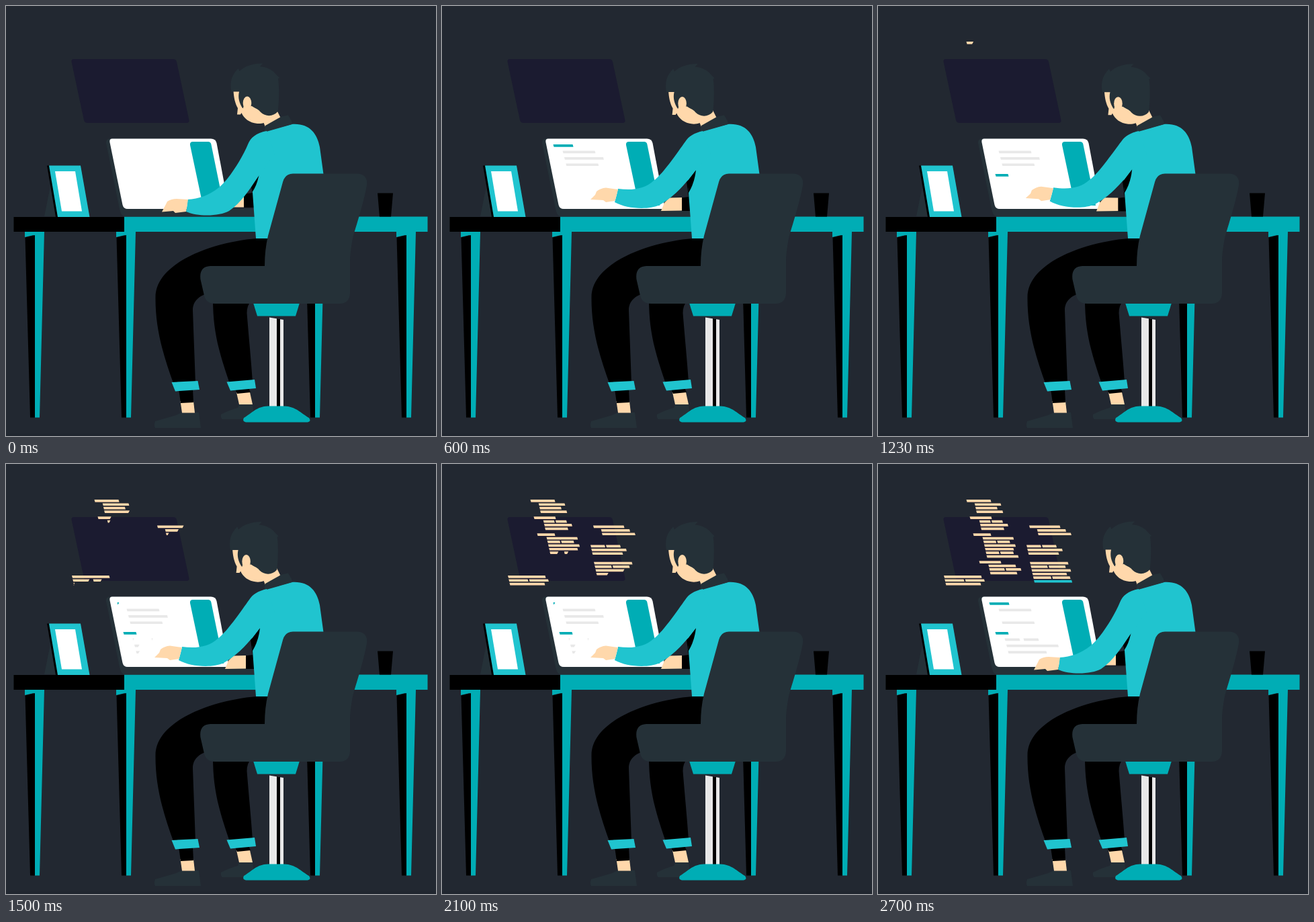
An HTML page that plays this animation: 640 by 640 pixels, repeating every 2.73 s.

```html
<!DOCTYPE html>
<html lang="en">
<head>
<meta charset="utf-8">
<title>Working at a desk</title>
<style>
  html, body { margin: 0; width: 100%; height: 100%; overflow: hidden; background: #222831; }
  svg { display: block; width: 100vw; height: 100vh; }
  .dark { fill: #253138; }
  .teal { fill: #00adb5; }
  .aqua { fill: #20c4cf; }
  .skin { fill: #ffd8ab; }
  .grey { fill: #e8e8e8; }
  .white { fill: #fff; }
</style>
</head>
<body>
<svg viewBox="0 0 640 640" xmlns="http://www.w3.org/2000/svg">
  <rect width="640" height="640" fill="#222831"/>
  <rect y="636" width="640" height="4" fill="#20262f"/>
  <path fill="#1b1b30" d="M101 79H249Q253 79 254 83L272.500 170Q273 174 269 174H121Q117 174 116 170L97.500 83Q97 79 101 79Z"/>
  <g id="code"></g>

  <g id="legs"></g>
  <path d="M11.500 314H176V336H11.500Z"/>
  <path class="teal" d="M176 313.500H627.500V336H176Z"/>
  <path d="M553 278.500H576L573 313.500H556Z"/>

  <path class="dark" d="M66 268L57 313H75Z"/>
  <path d="M61 237.500H65L78 314H74Z"/>
  <path class="aqua" d="M64 237.500H111L124.500 314H77Z"/>
  <path class="white" d="M73 246H103L113 305.500H83Z"/>

  <path class="dark" d="M156 197H306L330 302H371V313.500H176Q171 312 169 302L149 204Q148 198 156 197Z"/>
  <path class="white" d="M158 197.500H305Q312 197.500 313.500 204L332 302H181Q175 302 173.500 296L154.500 203Q153.500 197.500 158 197.500Z"/>
  <path class="teal" d="M278 202H301Q304.500 202 305.300 205.500L324 297H298Q293 297 292 292L274 207Q273.500 202 278 202Z"/>
  <g id="text"></g>

  <path class="dark" d="M347 593H367L370 615H322Q319 613 320 608Q333 601 345 598Z"/>
  <path class="skin" d="M343 575H363L367 593H347Z"/>
  <path d="M340 568H361L364 575L344 577Z"/>
  <path d="M308 436C308 485 317 515 333 562L367 560C365 530 362 500 358.500 457Q358.500 446 364 440Z"/>
  <path class="aqua" d="M328.500 559.500L370 556L372 569L334 572.500Z"/>
  <path class="dark" d="M262 605H287L290 628H222Q220 624 222 618Q240 613 253 609Z"/>
  <path class="skin" d="M259.500 588H279L281 605.500H262Z"/>
  <path d="M257 570H278L279 590L260 591Z"/>
  <path d="M392 346H373C310 351 223 381 222.500 433C222 480 234 520 250 564L282 562L278 453C278 439 288 431 300 428L392 420Z"/>
  <path class="aqua" d="M246.500 560L285.500 558L288 571L252 573.500Z"/>

  <path class="skin" d="M378 160L403 155L409 167L386 180Z"/>
  <path id="sleeve"/>
  <path id="farHand" class="skin"/>
  <path class="aqua" d="M384 187L425 176C451 174 463 189 467 210L473 254L430 346H372L366 264L362 212Z"/>
  <path id="gap"/>
  <path class="dark" d="M386 178L409 165L420 162.500L425 171L426 176L384 188Z"/>
  <path id="arm" class="aqua"/>
  <path id="hand" class="skin"/>

  <g id="head">
    <path class="skin" d="M338.500 126H350L362 146L402 157C400 166 388 176 374 175C362 174 354 167 350.500 159L349 161.500H344L345 152C341 145 339 136 338.500 126Z"/>
    <path class="dark" d="M335.500 127.500C332 109 339 100 345.500 93L347.500 97C355 89 370 85 382 85.500L378 90C388 91 397 95 401 101L407 107L405 108C407 120 406.500 145 404.500 157C398 165 386 165 379 158C374 152 369 152 366 150L352 152C347 144 345 136 347 127.500Z"/>
    <ellipse class="skin" cx="359" cy="144.500" rx="6.300" ry="10"/>
    <path class="skin" d="M353 150L366 149L377 156L372 166L356 164Z"/>
  </g>

  <path class="teal" d="M368 442H437L431 461.500H374Z"/>
  <path class="grey" d="M392 463.500L413 467V597H392Z"/>
  <path d="M403 465L408 466V597H403Z"/>
  <path class="teal" d="M357 619.500Q351 618 354 613C366 606 373 596 390 595.500H414C431 596 439 606 451 613Q455 618 449 619.500Z"/>
  <path class="dark" d="M427 249.500H522Q539 250 537 267C532 295 521 327 516 346Q512 367 512 380V428Q511 443 496 443H311Q298 443 295 431L289.500 407Q287 388 304 387H385Q385 363 390 342L412 262Q415.500 249.500 427 249.500Z"/>
</svg>
<script>
const LOOP = 2730, STEP = 30, SWAY = 900;
const $ = id => document.getElementById(id);
const clamp = v => Math.max(0, Math.min(1, v));

function add(parent, cls, d = '') {
  const p = document.createElementNS('http://www.w3.org/2000/svg', 'path');
  p.setAttribute('class', cls);
  p.setAttribute('d', d);
  $(parent).append(p);
  return p;
}

for (const x of [28, 164, 445, 581]) {
  add('legs', 'teal', `M${x} 336h29l-7 276.500h-7L${x + 13} 341L${x} 344Z`);
  add('legs', '', `M${x + .5} 344.500L${x + 15} 341V612.500H${x + 8}Z`);
}

// Every bar knows its place, full width and how much of it shows at a time
const bars = [];
function bar(parent, cls, x, y, w, shown) {
  const el = add(parent, cls);
  bars.push(t => {
    const part = clamp(shown(t)), now = w * part;
    // The end leans back until the bar is complete
    const lean = part === 1 ? 1 : -Math.min(2, now);
    el.setAttribute('d', now < .5 ? '' : `M${x} ${y}h${now}l${lean} 3.7H${x + 1}Z`);
  });
}

// Code: blocks of slanted rows, typed bar by bar; every third row is split in two
let blocks = 0;
function typist(start, gap) {
  return ({ x, y, head, body, rows, indent = 0, split, last = 'skin' }) => {
    for (let r = 0; r < rows; r++) {
      const wave = 4 * Math.sin(r * 2.4 + blocks * Math.PI);
      const w = r ? body + wave : head;
      const halves = r % 3 === split ? 2 : 1;
      const left = x + r * 1.2 + (r ? indent : 0);
      for (let h = 0; h < halves; h++) {
        const at = start;
        start += gap;
        bar('code', r === rows - 1 ? last : 'skin', left + h * (w / 2 + 1), y + r * 5.4,
          halves > 1 ? w / 2 - 1 : w, t => (t - at) / 160);
      }
    }
    blocks++;
  };
}
const main = typist(1183, 54), foot = typist(1290, 68), side = typist(1361, 62);
main({ x: 131.5, y: 53, head: 36, body: 36, rows: 4, indent: 11 });
main({ x: 136.5, y: 78.3, head: 32, body: 37, rows: 4, indent: 13, split: 1 });
main({ x: 141.5, y: 103.3, head: 26, body: 43, rows: 7, indent: 12.8, split: 2 });
main({ x: 150.5, y: 144.3, head: 32, body: 43, rows: 4, indent: 12.5, split: 2 });
foot({ x: 98, y: 166, head: 55.5, body: 56, rows: 3, split: 1 });
side({ x: 225, y: 91.6, head: 45.5, body: 45, rows: 3, indent: 10.5 });
side({ x: 221, y: 120.6, head: 44, body: 49, rows: 3, split: 0 });
side({ x: 226, y: 145.7, head: 56.5, body: 54, rows: 6, split: 1, last: 'aqua' });

// Laptop text: typed once, then some lines come and go with the hands
const swing = t => (1 - Math.cos(2 * Math.PI * t / SWAY)) / 2;
const stay = () => 1;
const away = t => t < SWAY ? 1 : 1.3 - 1.6 * swing(t);
const near = t => t < SWAY * 1.5 ? 1 : 1.6 * swing(t) - .1;
let typed = 60;
function line(cls, x, y, w, rule) {
  const at = typed;
  typed += 110;
  bar('text', cls, x, y, w, t => Math.min((t - at) / 200, rule(t)));
}
line('teal', 165.5, 206, 29, away);
[stay, near, stay].forEach((rule, i) =>
  line('grey', 179.5 + i * 2.4, 215.5 + i * 9.45, 48 + 10 * (i % 2), rule));
typed = 610;
line('teal', 174.5, 250, 19, stay);
for (const x of [188.5, 216.5]) line('grey', x, 259.5, 22, away);
for (const i of [0, 1]) {
  typed = 760 + i * 30;
  line('grey', 191 + i * 2.4, 268.8 + i * 9.45, 77 - i * 20, away);
}

// Two poses per moving part, blended number by number
const poses = {
  arm: [
    'M388 186C372 189 364 196 360 206C351 228 330 260 317 270C302 282 287 287 270 288Q270 297 268 306C286 314 318 313 332 305C350 293 362 274 376 253L400 220Z',
    'M388 186C375 189 367 194 362 202C349 220 328 251 315 260C302 272 284 275 262 272Q260 282 257 292C275 302 307 304 324 296C344 285 361 267 377.5 244.5L400 220Z'],
  hand: [
    'M271 288L254 287Q246 287 240 291L237 297L232 306.5L249 305L252 308L268 306Z',
    'M262 273L244 270.5Q236 271 230 276L228 281L221 288L240 289L244 292L257.5 290Z'],
  sleeve: [
    'M376 253L364 265L367 278L354 280L354 300L370 300L380 270Z',
    'M377 245L364 262L367 284L356 285.5L357 305L370 305L380 270Z'],
  gap: [
    'M376.5 252L365 266L366.5 277Q373 268 376.5 252Z',
    'M378 244L365 261L367 278Q376 263 378 244Z'],
  farHand: [
    'M354 280L347 287L341 292L335 299.5L354 299.5Z',
    'M357 285L338 285.5L331 293L326 305L357 304.5Z']
};
const num = /-?\d+(\.\d+)?/g;
function blend([a, b], k) {
  const to = b.match(num);
  let i = 0;
  return a.replace(num, n => (+n + (to[i++] - n) * k).toFixed(2));
}

function draw(t) {
  // The second pose is reached at three quarters of the swing
  const k = swing(t) / .75;
  for (const id in poses) $(id).setAttribute('d', blend(poses[id], k));
  $('head').setAttribute('transform', `translate(${-1.4 * k} ${.6 * k})`);
  bars.forEach(show => show(t));
}

const begin = performance.now();
function tick() {
  const t = (performance.now() - begin) % LOOP;
  draw(Math.floor(t / STEP) * STEP);
  requestAnimationFrame(tick);
}
draw(0);
requestAnimationFrame(tick);
</script>
</body>
</html>
```
